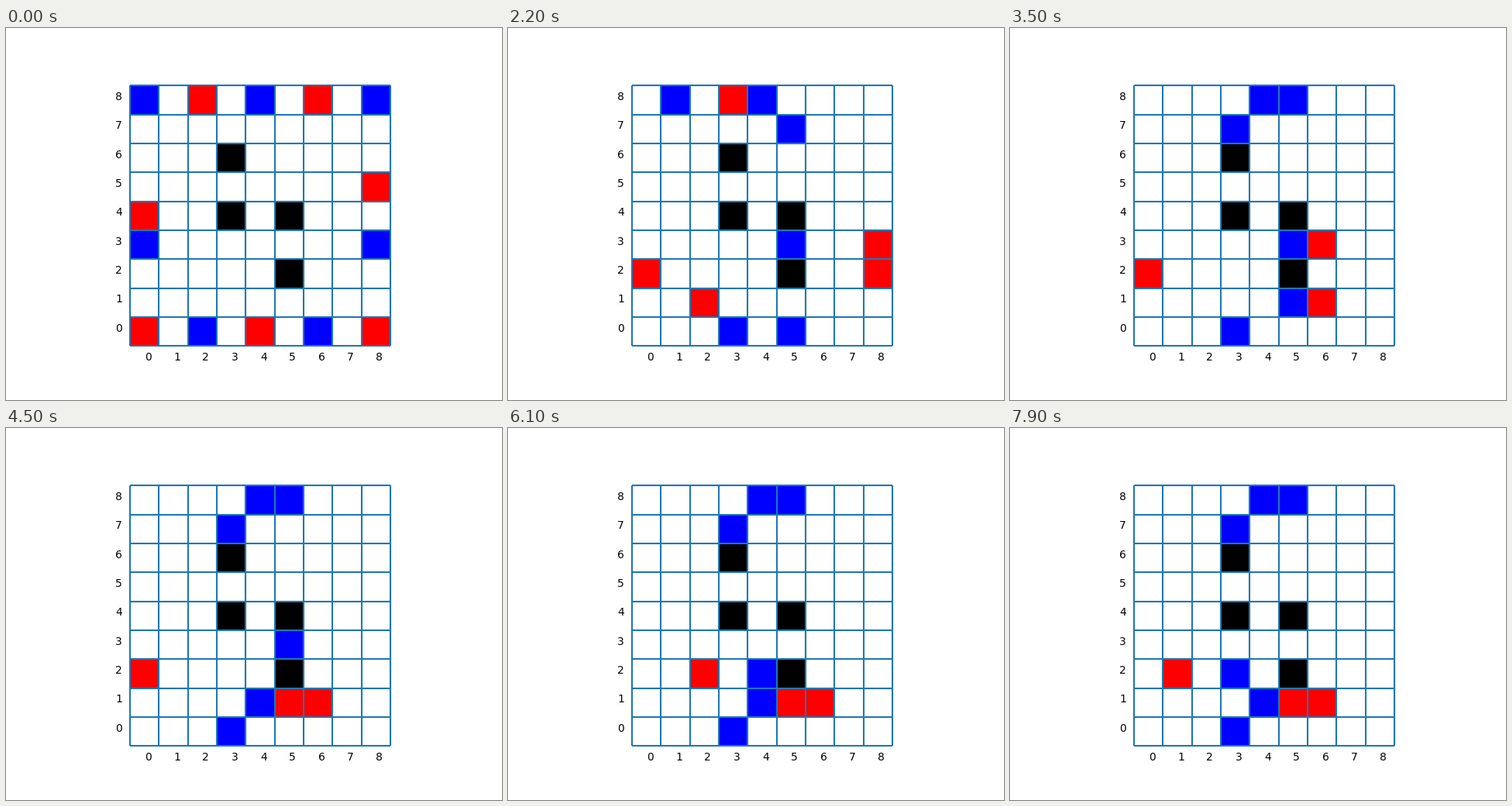
Animation of 640x480 px, one loop 8000 ms. Source, as a matplotlib script:

```python
import matplotlib.pyplot as plt
from matplotlib.animation import FuncAnimation
from matplotlib.patches import Rectangle

SIZE = 9
FRAMES = 80
INTERVAL = 100

STEP = {"L": (-1, 0), "R": (1, 0), "U": (0, 1), "D": (0, -1)}
WALLS = [(3, 6), (3, 4), (5, 4), (5, 2)]
SWAY = "RL" * FRAMES

# Start square, then the routes: first turn and headings, one per own turn.
PLANS = {
    "blue": [
        ((0, 8), {11: "R", 23: "RRD"}),
        ((4, 8), {}),
        ((8, 8), {15: "LLLD", 35: "U"}),
        ((0, 3), {13: "D"}),
        ((8, 3), {5: "LLL", 39: "LR", 47: "LDL" + SWAY}),
        ((2, 0), {1: "R", 43: "RL"}),
        ((6, 0), {3: "L", 29: "ULR", 37: "L"}),
    ],
    "red": [
        ((2, 8), {22: "R"}),
        ((6, 8), {10: "L"}),
        ((8, 5), {6: "DD", 26: "LL", 36: "D", 40: "D"}),
        ((0, 4), {14: "DD", 42: "RLR" + SWAY}),
        ((0, 0), {12: "U", 18: "RR", 24: "R"}),
        ((4, 0), {}),
        ((8, 0), {2: "UU", 30: "LLD", 38: "L"}),
    ],
}


def shift(square, heading):
    dx, dy = STEP[heading]
    return square[0] + dx, square[1] + dy


def heading_at(routes, turn):
    """The colours alternate, so a route advances every second turn."""
    for first, headings in routes.items():
        i, odd = divmod(turn - first, 2)
        if not odd and 0 <= i < len(headings):
            return headings[i]
    return None


def surrounded(square, attackers):
    return sum(shift(square, h) in attackers for h in STEP) >= 2


def play():
    """Return the coloured squares after every turn."""
    sides = {color: [[square, routes] for square, routes in plans]
             for color, plans in PLANS.items()}
    history = []
    for turn in range(FRAMES):
        mover, rival = ("blue", "red") if turn % 2 else ("red", "blue")
        for piece in sides[mover]:
            heading = heading_at(piece[1], turn)
            if heading:
                piece[0] = shift(piece[0], heading)
        attackers = {square for square, _ in sides[mover]}
        sides[rival] = [p for p in sides[rival]
                        if not surrounded(p[0], attackers)]
        board = dict.fromkeys(WALLS, "black")
        for color, pieces in sides.items():
            board.update((square, color) for square, _ in pieces)
        history.append(board)
    return history


history = play()

fig, ax = plt.subplots(figsize=(6.4, 4.8), dpi=100)
ax.set_aspect("equal")
ax.axis("off")

for i in range(SIZE + 1):
    ax.plot([i, i], [0, SIZE], color="C0", lw=1.5, solid_capstyle="butt")
    ax.plot([0, SIZE], [i, i], color="C0", lw=1.5, solid_capstyle="butt")

cells = {}
for x in range(SIZE):
    ax.text(x + 0.5, -0.5, str(x))
    ax.text(-0.5, x + 0.5, str(x))
    for y in range(SIZE):
        cells[x, y] = ax.add_patch(Rectangle((x, y), 1, 1, lw=0))


def draw(turn):
    for square, cell in cells.items():
        cell.set_facecolor(history[turn].get(square, "white"))
    return list(cells.values())


anim = FuncAnimation(fig, draw, frames=FRAMES, interval=INTERVAL,
                     repeat=True, repeat_delay=0)
plt.show()
```
